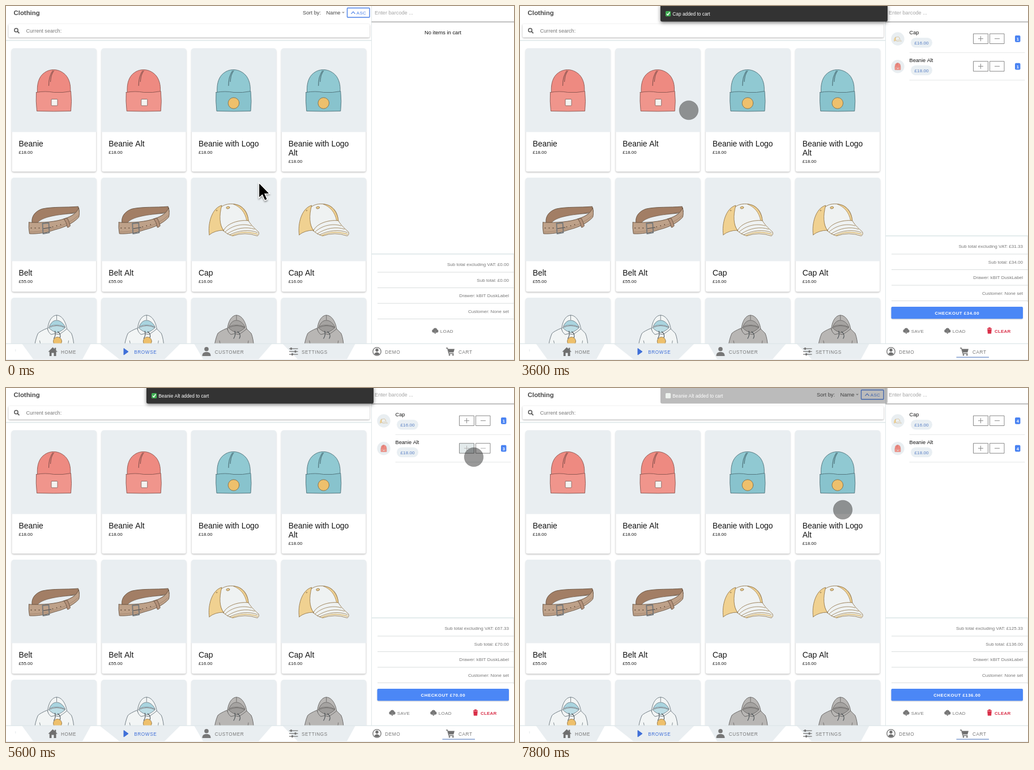
Recreate the animation shown at these times as an HTML page with a canvas. Size 897 px wide and 625 px high, loop 8000 ms.

```html
<!DOCTYPE html>
<html lang="en">
<head>
<meta charset="utf-8">
<title>Till</title>
<style>
html, body { margin: 0; width: 100%; height: 100%; overflow: hidden; background: #fff; }
canvas { display: block; }
</style>
</head>
<body>
<canvas id="stage" width="897" height="625"></canvas>
<script>
const c = document.getElementById('stage').getContext('2d');
const LOOP = 8000, STEP = 200;
const SANS = '"Liberation Sans", Arial, sans-serif';
const BLUE = '#4a80e8', GREY = '#777', PALE = '#e9eef1';

// pointer track: time, x, y
const TRACK = [
  [600, 448, 318], [800, 440, 300], [1999, 440, 300], [2000, 393, 267],
  [2200, 401, 370], [2600, 401, 370], [3000, 300, 220], [3200, 250, 182],
  [3400, 250, 182], [3600, 298, 184], [4000, 620, 142], [4400, 822, 120],
  [5200, 826, 122], [5800, 826, 122], [6200, 822, 66], [7200, 822, 66],
  [7400, 780, 95], [7800, 570, 215]
];
const CAP_ADDS = [2600, 6400, 6800, 7200];
const BEANIE_ADDS = [3400, 5000, 5400, 5800];
const TOASTS = [[2600, 5000, 'Cap'], [5400, 7800, 'Beanie Alt']];

function text(s, x, y, size, color, o = {}) {
  c.font = `${o.weight || 'normal'} ${size}px ${SANS}`;
  c.letterSpacing = (o.gap || 0) + 'px';
  c.textAlign = o.align || 'left';
  c.fillStyle = color;
  c.fillText(s, x, y);
}

function paint(fill, stroke, width = 1) {
  if (fill) { c.fillStyle = fill; c.fill(); }
  if (stroke) { c.strokeStyle = stroke; c.lineWidth = width; c.stroke(); }
}

function box(x, y, w, h, fill, r = 0, stroke, width) {
  c.beginPath();
  c.roundRect(x, y, w, h, r);
  paint(fill, stroke, width);
}

function dot(x, y, r, fill, stroke, width) {
  c.beginPath();
  c.arc(x, y, r, 0, Math.PI * 2);
  paint(fill, stroke, width);
}

function shape(d, fill, stroke, width) {
  const p = new Path2D(d);
  if (fill) { c.fillStyle = fill; c.fill(p); }
  if (stroke) { c.strokeStyle = stroke; c.lineWidth = width || 1; c.stroke(p); }
}

function rule(x, y, w, color, h = 1) {
  c.fillStyle = color;
  c.fillRect(x, y, w, h);
}

function shadow(on, blur = 3, y = 1, color = 'rgba(0,0,0,.32)') {
  c.shadowColor = on ? color : 'transparent';
  c.shadowBlur = on ? blur : 0;
  c.shadowOffsetY = on ? y : 0;
}

function at(x, y, draw, k = 1) {
  c.save();
  c.translate(x, y);
  c.scale(k, k);
  c.lineJoin = c.lineCap = 'round';
  draw();
  c.restore();
}

// Goods, each drawn around the middle of its picture
function beanie(dome, cuff, line, badge) {
  shape('M-29 4C-30-9-28-20-21-28C-14-35-7-37 0-37C9-37 18-32 23-25C29-16 30-6 29 4Z', dome, line, .9);
  shape('M-31 3Q-15 0 0 3Q16 4 30 1Q32 19 30 36Q0 37-30 36Q-32 18-31 3Z', cuff, line, .9);
  shape('M-2-35C-8-27-9-18-9-9M0-35C-4-30-5-26-6-16', null, line, 1.2);
  if (badge) dot(0, 22, 9.8, '#eec06c', '#7d704f', .9);
  else box(-4.5, 15, 11, 11.5, '#f4f3f0', 1, '#8b6560', .9);
}

function redBeanie() { beanie('#ee8a81', '#f0958c', '#8a544f'); }
function tealBeanie() { beanie('#90c9d2', '#88c3cd', '#4d7078', true); }

function belt() {
  const line = '#66513f';
  shape('M-38 9C-41-3-33-13-20-17C0-21 20-19 43-21L45-12C30-8-20-4-24 10Z', '#a27e65', line, .9);
  shape('M-29 8C-22-3 8-7 37-9C28 1 0 7-29 9Z', PALE, line, .7);
  shape('M-44 7C-20 8 5 6 20 0C32-4 40-9 44-19Q46-8 44-2C34 9 18 16 2 20C-12 25-30 28-43 27Q-45 16-44 7Z', '#bea189', line, .9);
  shape('M-42 24C-14 24 22 14 43-5', null, '#9a7c66', .7);
  shape('M-20 9L-9 8L-8 25L-19 27Z', null, '#73777a', 1.8);
  shape('M-18 18L-5 16', null, '#66605c', 1.5);
  shape('M18 1Q22-1 24 0Q27 6 29 13Q27 16 24 16Q23 8 18 1Z', '#b3917a', line, .9);
  for (let i = 0; i < 3; i++) {
    dot(-40 + i * 7, 17, 1, line);
    dot(-2 + i * 7, 15 - i * 2, .9, line);
  }
}

function cap() {
  const line = '#94784c', gold = '#f0d191', white = '#eff2f2';
  shape('M-23-19C-15-28 4-27 13-21C22-15 25-6 26 4Q-2 6-18 22C-26 8-28-6-23-19Z', white, line, .9);
  shape('M-43 29C-46 10-39-18-21-23C-26-5-25 12-18 21Q-33 21-43 29Z', gold, line, .9);
  shape('M0-25C12-25 24-14 26 4L23 4C20-11 12-20 0-25Z', gold, line, .7);
  shape('M-18 22C-13 9 9 2 26 4C32 14 40 20 44 24Q46 28 42 31Q20 23-2 31Q-12 28-18 22Z', white, line, .9);
  shape('M-15 24C-4 13 15 8 31 13M-11 27C4 17 22 14 37 19M-7 29C9 21 27 19 42 25', null, line, .8);
  shape('M-3 30Q18 20 42 28', null, '#dcb970', 1.4);
  c.beginPath();
  c.ellipse(-10, -19, 3, 1.9, -.2, 0, 7);
  paint(gold, line);
  dot(-30, -14, .9, null, line, .7);
}

function hoodie(fill, lining, line, badge) {
  shape('M-12 20Q-24 25-28 29Q-33 40-35 58H36Q35 38 31 29Q27 25 22 20Z', fill, line, .9);
  shape('M-11 22C-10 7-3-3 5-3C14-3 21 8 23 21Q16 27 9 31Q1 28-5 31Q-10 27-11 22Z', fill, line, .9);
  shape('M-8 17C-5 9 0 6 5 6C11 6 17 11 20 18Q6 11-8 17Z', lining, line, .8);
  shape('M-9 19Q5 12 20 19Q15 24 6 28Q-4 25-9 19Z', badge ? '#bcdde5' : '#9d9b99', line, .8);
  shape('M5-3V5M-25 42L-22 56M26 42L24 56', null, line, .8);
  shape('M2 25Q4 32 0 38M7 26Q14 31 10 38', null, '#454c50', 1.1);
  if (badge) dot(6.5, 43, 7.5, '#eec06c', '#8a7048', .8);
}

function whiteHoodie() { hoodie('#f2f5f5', '#a9d4df', '#66727a', true); }
function greyHoodie() { hoodie('#b8b6b4', '#a5a3a1', '#62605f'); }

function card(col, y, imgH, bottom, draw, lines, price) {
  const x = 9.5 + col * 158.75;
  shadow(true);
  box(x + 1, y + 2, 148.5, bottom - y - 2, '#fff', 3);
  shadow(false);
  box(x, y, 150.5, imgH, PALE, [5, 5, 0, 0]);
  at(x + 75, y + (y > 500 ? 34 : y > 300 ? 72 : 75), draw);
  lines.forEach((s, i) => text(s, x + 13, y + imgH + 25.5 + i * 16, 13.9, '#151515'));
  text(price, x + 13, y + imgH + 38 + (lines.length - 1) * 16, 8, '#1c1c1c');
}

function shop() {
  text('Clothing', 13.5, 16, 11.4, '#484848', { weight: 'bold' });
  text('Sort by:', 524, 15, 9.3, '#444');
  text('Name', 565.5, 15, 9.3, '#444');
  shape('M593 10.5H598L595.5 13Z', '#999');
  box(602.5, 3.5, 39.5, 16.5, null, 1, BLUE, 1.4);
  shape('M609.5 13.8L613 10.2L616.5 13.8', null, BLUE, 1.2);
  text('ASC', 618.8, 15, 8, BLUE, { gap: .3 });

  shadow(true, 3, 1);
  box(4.5, 32, 637.5, 23.5, '#fff', 2);
  shadow(false);
  dot(18, 42.7, 3.1, null, '#555', 1.5);
  shape('M20.4 45.2L23.5 48.2', null, '#555', 1.7);
  text('Current search:', 35.5, 47, 9.1, '#777');
  rule(0, 60, 645, '#dfe8e9', 1.6);

  const art = [redBeanie, redBeanie, tealBeanie, tealBeanie, belt, belt, cap, cap,
    whiteHoodie, whiteHoodie, greyHoodie, greyHoodie];
  const names = [['Beanie'], ['Beanie Alt'], ['Beanie with Logo'], ['Beanie with Logo', 'Alt'],
    ['Belt'], ['Belt Alt'], ['Cap'], ['Cap Alt']];
  c.save();
  c.beginPath();
  c.rect(0, 62, 645, 534);
  c.clip();
  for (let i = 0; i < 4; i++) {
    card(i, 74.5, 148, 292.5, art[i], names[i], '£18.00');
    card(i, 303, 147.5, 504.5, art[i + 4], names[i + 4], i < 2 ? '£55.00' : '£16.00');
    card(i, 515, 148, 720, art[i + 8], [], '');
  }
  c.restore();
}

function cloud(x, y) {
  dot(x - 2.8, y + .8, 2.8, GREY);
  dot(x, y - 1, 3.5, GREY);
  dot(x + 3, y + .9, 2.6, GREY);
  shape(`M${x} ${y - 1}V${y + 5}M${x - 2} ${y + 3}L${x} ${y + 5}L${x + 2} ${y + 3}`, null, '#858585', 1.3);
}

function cartRow(y, name, price, count, draw, k, hot) {
  dot(667, y + 58, 11.7, PALE);
  at(667, y + 58, draw, k);
  text(name, 687.5, y + 50, 9.2, '#151515');
  box(690, y + 56, 38, 17.5, '#e9eff3', 8.7);
  text(price, 709, y + 68, 8.1, '#587fc4', { align: 'center' });
  box(800.5, y + 49, 26, 17.5, hot ? '#e3eaeb' : '#fff', 0, '#888');
  box(829.5, y + 49, 25.5, 17.5, '#fff', 0, '#888');
  shape(`M809 ${y + 57.7}H818M813.5 ${y + 53.2}V${y + 62.2}M838 ${y + 57.7}H847`, null, hot ? '#b5b5b5' : '#8a8a8a', 1);
  box(874, y + 52, 9.5, 11.8, '#4a83f2', 2);
  text(count, 878.8, y + 60.8, 7.6, '#fff', { align: 'center', weight: 'bold' });
  rule(687.5, y + 81.7, 204, '#e4e6e6');
}

function cart(t) {
  const bought = list => list.filter(a => t >= a).length;
  const caps = bought(CAP_ADDS), hats = bought(BEANIE_ADDS);
  const money = v => '£' + v.toFixed(2);
  const sum = caps * 16 + hats * 18, net = caps * 40 / 3 + hats * 18;

  rule(645, 0, 1, '#dfe6e8', 596);
  text('Enter barcode ...', 651, 15, 9.2, '#a4a4a4');
  rule(645.5, 27.5, 251.5, '#969696', 1.2);

  if (!caps) text('No items in cart', 771.5, 50, 9.35, '#151515', { align: 'center' });
  if (caps) cartRow(0, 'Cap', '£16.00', caps, cap, .15, t >= 6200 && t < 7400);
  if (hats) cartRow(48.7, 'Beanie Alt', '£18.00', hats, redBeanie, .17, t >= 4600 && t < 6000);

  const top = caps ? 405 : 437;
  rule(645, top, 252, '#dde7e8', 1.6);
  rule(895.7, top, 1, '#e3eaeb', 118);
  ['Sub total excluding VAT: ' + money(net), 'Sub total: ' + money(sum),
    'Drawer: kBIT DuskLabel', 'Customer: None set'].forEach((s, i) => {
    text(s, 888, top + 22 + i * 27.5, 8.1, GREY, { align: 'right' });
    rule(656, top + 32.5 + i * 27.5, 241, '#dadede');
  });

  const shift = caps ? 0 : 3;
  cloud(754.8 + shift, 573);
  text('LOAD', 763.8 + shift, 577, 8, GREY, { gap: .35 });
  if (!caps) return;
  shadow(true, 2, 1, 'rgba(0,0,0,.2)');
  box(655.5, 531, 232.5, 21.3, '#4b87f6', 2);
  shadow(false);
  text('CHECKOUT ' + money(sum), 771.8, 544.5, 7.8, '#fff', { align: 'center', weight: 'bold', gap: .55 });
  cloud(682, 573);
  text('SAVE', 690.8, 577, 8, GREY, { gap: .4 });
  const red = '#d92f48';
  shape('M825 569.5H833M827.5 569V568H830.5V569M825.8 571H832.2L831.6 578H826.4Z', red, red, 1.1);
  text('CLEAR', 838, 577, 8, red, { weight: 'bold', gap: .2 });
}

function nav(t) {
  rule(0, 596, 897, '#fff', 29);
  [[28, 150, 135, 48], [165, 308, 280, 200], [332, 470, 446, 348], [488, 617, 602, 515]]
    .forEach(([a, b, d, e]) => shape(`M${a} 596H${b}L${d} 623.5H${e}Z`, PALE));
  rule(0, 595.5, 897, '#dee7e9', 1.3);
  rule(0, 623.8, 897, '#e6ecee');
  rule(16.5, 606, .8, '#dfe4e6', 4);

  shape('M74.5 610.5L82.5 602.5L85.8 605.6V603.5H88.3V608L91 610.5H88.5V618H84.5V612.5H80.5V618H76.8V610.5Z', '#6f6f6f');
  shape('M208 604.5L216 610.3L208 616Z', '#3f6fd8', '#3f6fd8');
  dot(354, 605.8, 3.8, GREY);
  shape('M346.5 618C346.5 612 350 611 354 611S361.5 612 361.5 618Z', GREY);
  [[605, 503.5], [610, 511], [615, 505.5]].forEach(([y, x]) => {
    rule(500, y - .6, 15.5, GREY, 1.3);
    box(x - 1.5, y - 2, 3, 4, GREY, 1);
  });
  dot(655, 610, 7.2, '#fff', '#6f6f6f', 1.3);
  dot(655, 607.5, 2.7, '#6f6f6f');
  shape('M650 614.5Q655 608 660 614.5Q655 618.5 650 614.5Z', '#6f6f6f');
  shape('M777 604H779.5L782 613.5H790.5', null, '#6f6f6f', 1.3);
  shape('M780.5 605.5H792L790.3 611.5H781.8Z', '#6f6f6f');
  dot(783, 616, 1.4, '#6f6f6f');
  dot(789.3, 616, 1.4, '#6f6f6f');

  [['HOME', 97], ['BROWSE', 226.3], ['CUSTOMER', 368.7], ['SETTINGS', 522], ['DEMO', 669.3], ['CART', 799]]
    .forEach(([s, x]) => text(s, x, 613.5, 8.2, s === 'BROWSE' ? '#3f6fd8' : GREY, { gap: .6 }));
  if (t >= 2800) rule(770.5, 619.5, 57.5, '#6f8fc9', 1.3);
}

function toast(t) {
  const item = TOASTS.find(([from, to]) => t >= from && t <= to);
  if (!item) return;
  const [from, to, name] = item;
  const faded = t === from || t === to;
  if (!faded) shadow(true, 6, 2, 'rgba(0,0,0,.5)');
  box(248, -3, 401, 30.5, faded ? 'rgba(51,51,51,.33)' : '#333', 3);
  shadow(false);
  box(257, 9, 9.2, 9.2, faded ? '#eef3ef' : '#3fae52', 1.5);
  if (!faded) shape('M259 13.8L261 16L264.3 11', null, '#fff', 1.4);
  text(name + ' added to cart', 269.3, 17, 8.35, '#fff');
}

function pointer(t) {
  if (t < TRACK[0][0]) {
    shadow(true, 3, 2);
    shape('M446.5 312L446.5 339L452.5 333.5L457 343.5L461.5 341.5L457.2 331.8L465.5 331.3Z', '#000', '#fff', 1.6);
    shadow(false);
    shape('M447.5 314V337L452.8 332L457.3 342L460 340.7L455.7 331H463.5Z', '#000');
    return;
  }
  let i = 0;
  while (i < TRACK.length - 2 && t >= TRACK[i + 1][0]) i++;
  const [t0, x0, y0] = TRACK[i], [t1, x1, y1] = TRACK[i + 1];
  const p = Math.min(1, (t - t0) / (t1 - t0));
  dot(x0 + (x1 - x0) * p, y0 + (y1 - y0) * p, 16.8, 'rgba(20,20,20,.43)', 'rgba(20,20,20,.2)', 1);
}

function draw(t) {
  c.fillStyle = '#fff';
  c.fillRect(0, 0, 897, 625);
  shop();
  cart(t);
  nav(t);
  toast(t);
  pointer(t);
  if ((t >= 3200 && t < 3600) || (t >= 6000 && t < 6400)) box(.5, .5, 896, 624, null, 0, '#dcb95c');
}

let shown = -1;
function tick(now) {
  const t = Math.floor(now % LOOP / STEP) * STEP;
  if (t !== shown) draw(shown = t);
  requestAnimationFrame(tick);
}
draw(0);
requestAnimationFrame(tick);
</script>
</body>
</html>
```
